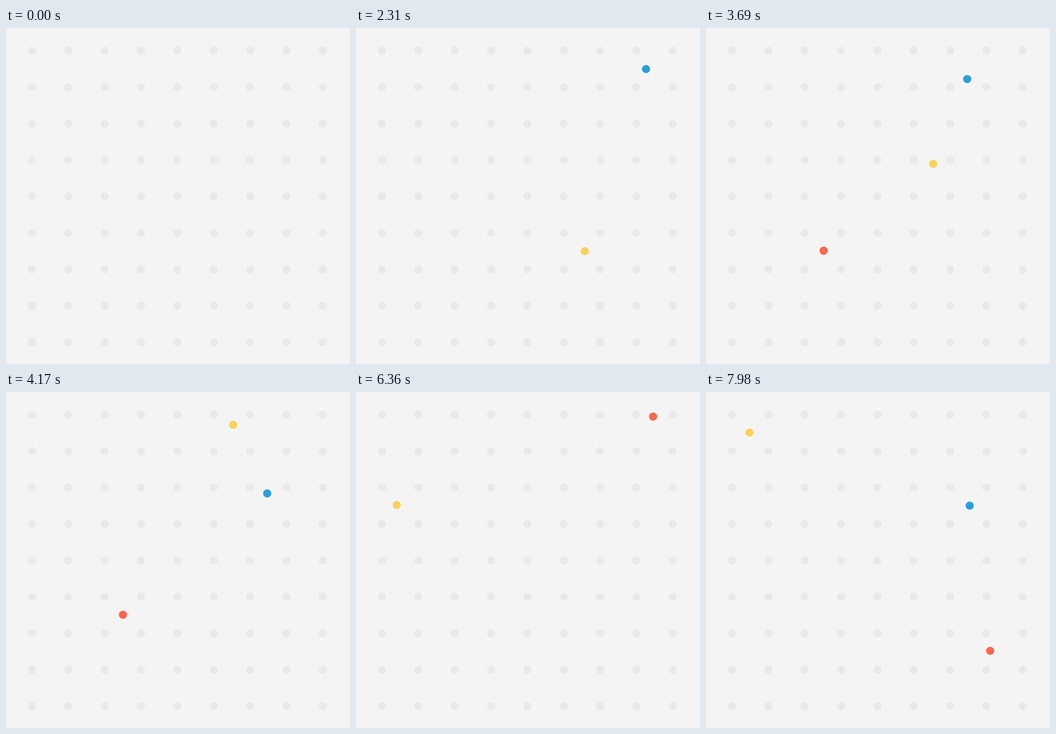
An HTML page for the animation above (8 s loop, 756x740 px).

```html
<!DOCTYPE html>
<html lang="en">
<head>
<meta charset="utf-8">
<title>Dots on a grid</title>
<style>
  html, body { margin: 0; width: 100%; height: 100%; overflow: hidden; background: #f4f4f4; }
  svg { display: block; width: 756px; height: 740px; }
</style>
</head>
<body>
<svg viewBox="0 0 756 740"></svg>
<script>
const W = 756, H = 740, LOOP = 8000, TICK = 30;
const GLIDE = 950, LEAVE = 1650;
const DIRS = { up: [0, -1], down: [0, 1], left: [-1, 0], right: [1, 0] };
const svg = document.querySelector('svg');

function circle(x, y, fill) {
  const c = document.createElementNS('http://www.w3.org/2000/svg', 'circle');
  const set = (cx, cy) => { c.setAttribute('cx', cx); c.setAttribute('cy', cy); };
  c.setAttribute('r', 9);
  c.setAttribute('fill', fill);
  set(x, y);
  svg.append(c);
  return set;
}

for (let i = 0; i < 81; i++) {
  circle(57.1 + 79.88 * (i % 9), 50 + 80.25 * Math.floor(i / 9), '#e9e9e9');
}

// A visit begins at a point off stage; each move is start time, direction, distance.
const visit = (x, y, ...moves) => ({ x, y, moves });
const dots = [
  { color: '#f9d15b', visits: [
    visit(658.2, 773.5, [490, 'up', 282], [1444, 'left', 159], [3025, 'up', 540]),
    visit(-224.5, 249, [5487, 'right', 320], [6786, 'up', 159.5])
  ] },
  { color: '#2b9fda', visits: [
    visit(814, 90.5, [1680, 'left', 240], [3469, 'down', 160], [5133, 'right', 808]),
    visit(788.5, 250.2, [7116, 'left', 214])
  ] },
  { color: '#ff664d', visits: [
    visit(258.5, 858.6, [2467, 'up', 368], [4105, 'left', 345]),
    visit(652.8, -70, [6092, 'down', 640], [7725, 'left', 160])
  ] }
];
dots.forEach(d => { d.set = circle(-50, -50, d.color); });

const ease = u => u * u * (3 - 2 * u);
const onStage = (x, y) => x >= 0 && x <= W && y >= 0 && y <= H;

function place({ visits, set }, t) {
  const now = visits.filter(v => v.moves[0][0] <= t).pop() || visits[0];
  let { x, y } = now;
  for (const [start, dir, dist] of now.moves) {
    if (t < start) break;
    const dx = DIRS[dir][0] * dist, dy = DIRS[dir][1] * dist;
    const span = onStage(x + dx, y + dy) ? GLIDE : LEAVE;
    const k = ease(Math.min(1, (t - start) / span));
    x += dx * k;
    y += dy * k;
  }
  set(x, y);
}

const begin = performance.now();
function draw() {
  const t = (performance.now() - begin) % LOOP;
  const held = Math.floor(t / TICK) * TICK;
  dots.forEach(d => place(d, held));
  requestAnimationFrame(draw);
}
draw();
</script>
</body>
</html>
```
